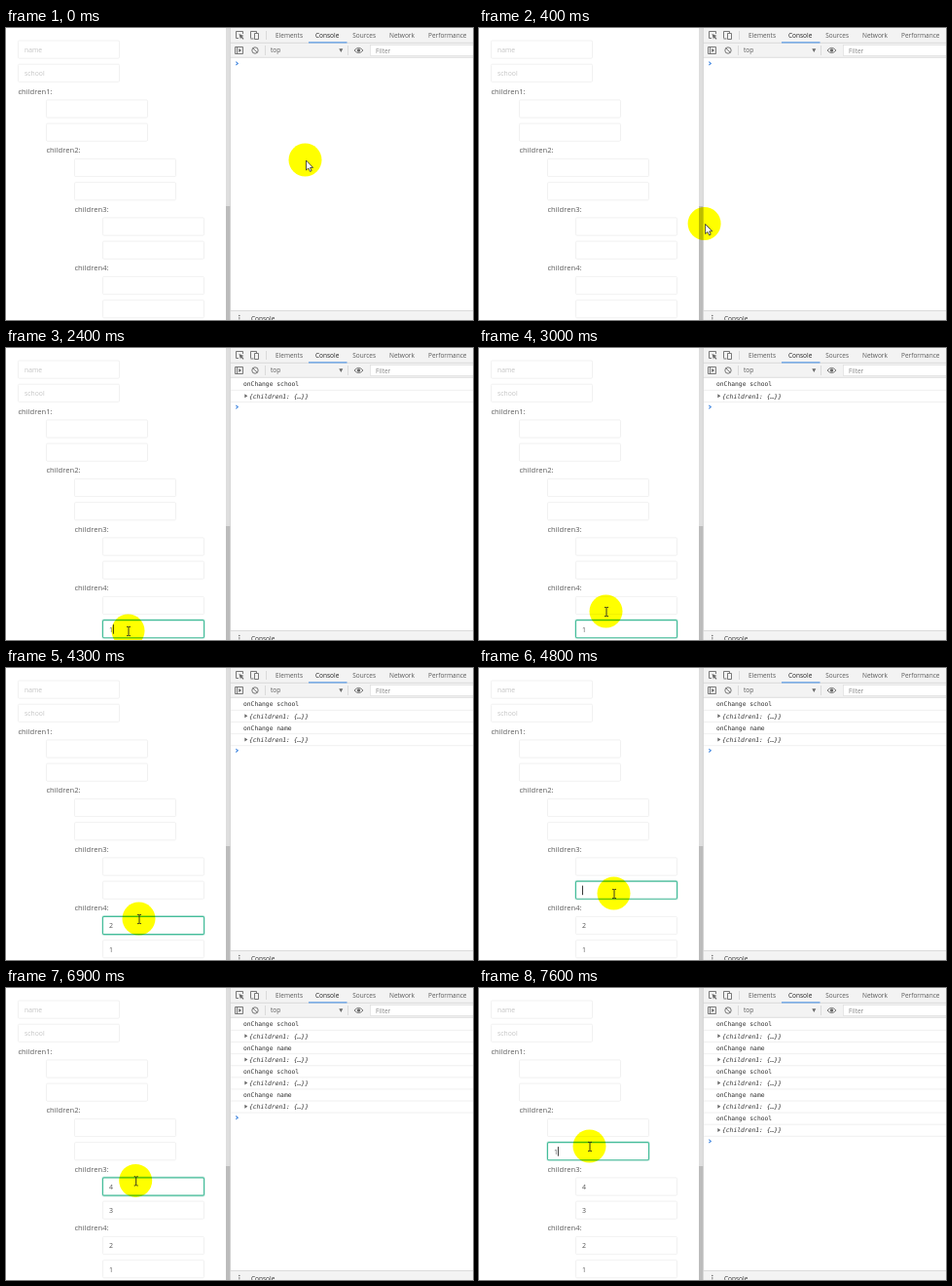
Recreate the animation shown at these times as an HTML page. Size 480 by 300 pixels, loop 8 s.

```html
<!DOCTYPE html>
<html lang="en">
<head>
<meta charset="utf-8">
<title>Nested form logging changes</title>
<style>
  html, body { margin: 0; width: 100%; height: 100%; overflow: hidden; background: #fff; }
  svg { display: block; width: 100vw; height: 100vh; }
  text { font: 6.5px "Open Sans", "Noto Sans", sans-serif; fill: #5a5a5a; white-space: pre; }
  .label { font-size: 7.6px; }
  .value { font-size: 7px; fill: #555; }
  .hint { font-size: 6.8px; fill: #c4c4c4; }
  .log { font: 6.33px "DejaVu Sans Mono", monospace; fill: #303030; }
  .object { font-style: italic; }
  .icon { fill: none; stroke: #6a6a6a; stroke-width: .9; }
  .solid { fill: #6a6a6a; }
  .rule { stroke: #cfcfcf; stroke-width: .7; }
</style>
</head>
<body>
<svg id="stage" viewBox="0 0 480 300">
  <g id="form"></g>

  <rect x="226" width="4.5" height="300" fill="#dedede"/>
  <rect x="226" y="183" width="4.5" height="117" fill="#bcbcbc"/>
  <rect x="230.5" width="249.5" height="30" fill="#f3f3f3"/>
  <rect x="230.5" y="290.5" width="249.5" height="9.5" fill="#f3f3f3"/>
  <path class="rule" d="M230.5 0V300M230.5 15.3H480M230.5 30.3H480M230.5 290.5H480M267.5 3V12M266.5 18V28M351.5 18V28"/>
  <rect x="374.5" y="17.5" width="110" height="11" fill="#fff" stroke="#dedede" stroke-width=".7"/>
  <path d="M311 14.8H350.5" stroke="#5b9be6" stroke-width="1.2"/>

  <path class="icon" d="M239 10.5H236.5V3.5H243.5V6M251.5 10.5V3.5H257.5V5M251.5 11H254.5M255.5 5.5H259.5V11.5H255.5Z"/>
  <path class="solid" d="M239.5 6L244.5 8L242.6 8.8L244.5 11L243.6 11.8L241.7 9.8L240.9 11.5Z"/>
  <path class="icon" d="M235.5 19.5H243.5V26.5H235.5ZM237.5 19.5V26.5M253.9 20.8L258.2 25.1"/>
  <circle class="icon" cx="256" cy="23" r="3.2"/>
  <path class="solid" d="M239.2 21L242.2 23L239.2 25ZM342.3 21.3H346.3L344.3 24.9Z"/>
  <path class="icon" d="M358 23Q362.5 17.8 367 23Q362.5 28.2 358 23Z"/>
  <circle class="solid" cx="362.5" cy="23" r="1.7"/>
  <g class="solid">
    <circle cx="239.8" cy="295.5" r=".8"/><circle cx="239.8" cy="298" r=".8"/><circle cx="239.8" cy="300.4" r=".8"/>
  </g>

  <text x="277" y="9.8">Elements</text>
  <text x="318" y="9.8" style="fill:#222">Console</text>
  <text x="356.2" y="9.8">Sources</text>
  <text x="394" y="9.8">Network</text>
  <text x="434" y="9.8">Performance</text>
  <text x="272" y="25.3">top</text>
  <text x="380" y="25.5" style="fill:#858585">Filter</text>
  <text x="252" y="300.8" style="fill:#333">Console</text>

  <g id="console"></g>
  <path id="prompt" d="M0 -1.7L2 0L0 1.7" fill="none" stroke="#4488e0" stroke-width="1.1"/>
  <path id="caret" d="M0 0V9.6" stroke="#222" stroke-width=".9"/>
  <circle id="halo" r="17" fill="#ff0" style="mix-blend-mode:multiply"/>
  <path id="arrow" d="M0 0V10L2.3 8L4 11.4L5.6 10.7L4.1 7.4H7.1Z" fill="#fff" stroke="#222" stroke-width=".8"/>
  <path id="beam" d="M-2 -4.6H-.6L0 -4L.6 -4.6H2M0 -4V4M-2 4.6H-.6L0 4L.6 4.6H2" fill="none" stroke="#222" stroke-width=".9"/>
</svg>

<script>
const LOOP = 8000, STEP = 100, FADE = 300, BLINK = 500, ROW = 12.1;
const FIELD = { width: 104, height: 18.2 };
const byId = id => document.getElementById(id);

function add(parent, tag, attrs, content = "") {
  const node = document.createElementNS("http://www.w3.org/2000/svg", tag);
  for (const key in attrs) node.setAttribute(key, attrs[key]);
  node.textContent = content;
  parent.append(node);
  return node;
}

// Fields are numbered top to bottom, two per group.
const fields = [];
function addField(x, y, hint) {
  const form = byId("form"), rounded = { x, y, ...FIELD, rx: 1.2, fill: "none" };
  const glow = add(form, "rect", { ...rounded, stroke: "#45bd9a", "stroke-width": 2.6 });
  add(form, "rect", { ...rounded, fill: "#fff", stroke: "#eee", "stroke-width": .8 });
  const ring = add(form, "rect", { ...rounded, stroke: "#45bd9a", "stroke-width": 1.1 });
  if (hint) add(form, "text", { x: x + 6.6, y: y + 11.7, class: "hint" }, hint);
  const value = add(form, "text", { x: x + 6.6, y: y + 11.9, class: "value" });
  fields.push({ x, y, glow, ring, value });
}

addField(12.5, 13, "name");
addField(12.5, 37.2, "school");
for (let group = 1; group <= 4; group++) {
  const indent = Math.min(group, 3); // the last two groups are siblings
  const x = 12.5 + 29 * indent, y = 13.4 + 60.5 * group;
  add(byId("form"), "text", { x: x - 29, y: y - 6.2, class: "label" }, `children${group}:`);
  addField(x, y);
  addField(x, y + 24.2);
}

const edits = [
  { field: 9, focus: 900, type: 2100, text: "1" },
  { field: 8, focus: 3100, type: 3500, text: "2" },
  { field: 7, focus: 4500, type: 5000, text: "3" },
  { field: 6, focus: 5500, type: 6100, text: "4" },
  { field: 5, focus: 7200, type: 7600, text: "1" }
];

edits.forEach((edit, i) => {
  const group = edit.log = add(byId("console"), "g", {});
  const y = 39.4 + 2 * i * ROW;
  add(group, "text", { x: 244, y, class: "log" }, `onChange ${i % 2 ? "name" : "school"}`);
  add(group, "text", { x: 250, y: y + ROW, class: "log object" }, "{children1: {…}}");
  add(group, "path", { d: `M245.3 ${y + ROW - 4.3}l3 2l-3 2Z`, fill: "#666" });
  add(group, "path", { d: `M231 ${y + 4}H480M231 ${y + 4 + ROW}H480`, stroke: "#ececec", "stroke-width": .8 });
});

// Pointer stops: time, x, y.
const stops = [
  [0, 308, 136], [900, 126, 293], [2300, 126, 293], [2400, 126, 291], [2500, 126, 291],
  [3000, 131, 271], [3300, 134, 266], [4000, 135, 266], [4300, 137, 258], [4500, 139, 234],
  [4800, 139, 232], [5200, 139, 232], [5600, 136, 202.5], [6800, 136, 202.5],
  [7300, 114, 163], [LOOP, 114, 163]
];
const ease = p => p * p * (3 - 2 * p);
const clamp = p => Math.max(0, Math.min(1, p));

function pointerAt(t) {
  const next = stops.findIndex(stop => stop[0] > t);
  const [t0, x0, y0] = stops[next - 1], [t1, x1, y1] = stops[next];
  const p = ease((t - t0) / (t1 - t0));
  return [x0 + (x1 - x0) * p, y0 + (y1 - y0) * p];
}

const move = (id, x, y) => byId(id).setAttribute("transform", `translate(${x} ${y})`);
const show = (node, visible) => node.style.display = visible ? "" : "none";

function drawFields(t) {
  for (const { glow, ring } of fields) glow.style.opacity = ring.style.opacity = 0;
  edits.forEach((edit, i) => {
    const { glow, ring, value } = fields[edit.field];
    const blur = edits[i + 1]?.focus ?? Infinity;
    const level = clamp((t - edit.focus) / FADE) * (1 - clamp((t - blur) / FADE));
    ring.style.opacity = level;
    glow.style.opacity = level * .25;
    value.textContent = t >= edit.type ? edit.text : "";
    show(edit.log, t >= edit.type);
  });
  move("prompt", 236.3, 36.4 + 2 * ROW * edits.filter(edit => t >= edit.type).length);
}

function drawCaret(t) {
  const edit = edits.findLast(e => t >= e.focus + STEP);
  const typed = edit && t >= edit.type;
  const since = edit && t - (typed ? edit.type : edit.focus + STEP);
  show(byId("caret"), edit && since % (2 * BLINK) < BLINK);
  if (!edit) return;
  const { x, y } = fields[edit.field];
  move("caret", x + (typed ? 10.9 : 7), y + 4.5);
}

function drawPointer(t) {
  const [x, y] = pointerAt(t);
  const overField = fields.some(f =>
    x >= f.x && x <= f.x + FIELD.width && y >= f.y && y <= f.y + FIELD.height);
  show(byId("beam"), overField);
  show(byId("arrow"), !overField);
  move("halo", x - .5, y - .5);
  move("beam", x, y);
  move("arrow", x + .5, y);
}

function frame() {
  const t = Math.floor(performance.now() % LOOP / STEP) * STEP;
  drawFields(t);
  drawCaret(t);
  drawPointer(t);
  requestAnimationFrame(frame);
}
frame();
</script>
</body>
</html>
```
